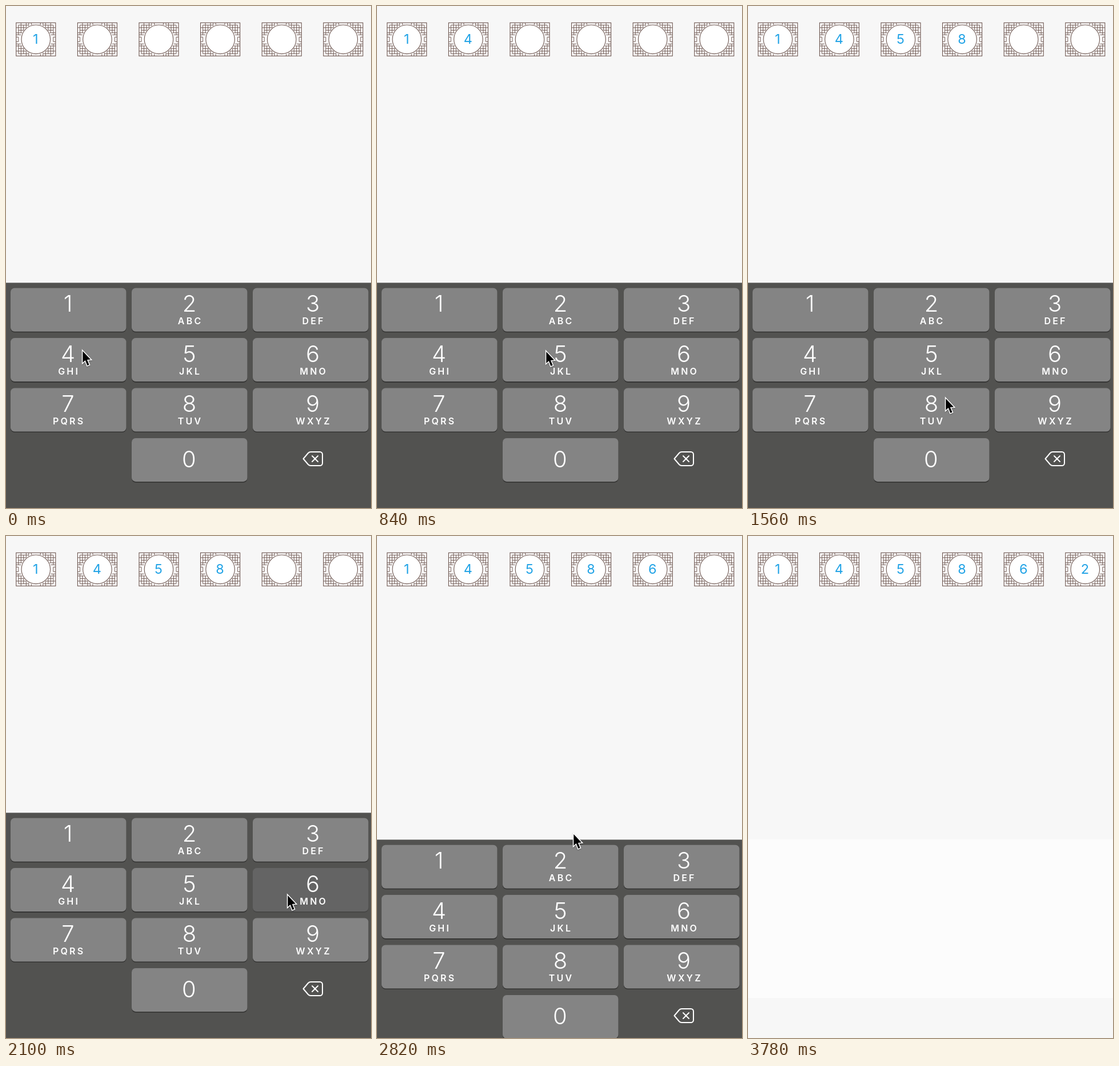
Animation of 639 by 877 pixels, one loop 4200 ms. Source, as an HTML page with a canvas:

```html
<!DOCTYPE html>
<html lang="en">
<head>
<meta charset="utf-8">
<title>Code entry keypad</title>
<style>
html, body { margin: 0; width: 100%; height: 100%; overflow: hidden; background: #f7f7f7; }
canvas { display: block; }
</style>
</head>
<body>
<canvas id="stage" width="639" height="877"></canvas>
<script>
const ctx = document.getElementById('stage').getContext('2d');
const W = 639, H = 877, LOOP = 4200, STEP = 60;
const FONT = 'Inter, Roboto, "Liberation Sans", sans-serif';
const BROWN = '#6c554f';

const KEYS = [
  ['1', ''], ['2', 'ABC'], ['3', 'DEF'],
  ['4', 'GHI'], ['5', 'JKL'], ['6', 'MNO'],
  ['7', 'PQRS'], ['8', 'TUV'], ['9', 'WXYZ'],
  null, ['0', '']
];
const TEXT_X = [108.5, 321, 537];

// digit, press time, release time, time it shows in its slot
const TAPS = [
  ['1', -1, -1, 0],
  ['4', 120, 240, 240],
  ['5', 900, 1020, 1020],
  ['8', 1440, 1560, 1560],
  ['6', 2040, 2160, 2160],
  ['2', 2640, 2760, 2880]
];

// time, x, y
const PATH = [
  [0, 133, 600], [300, 133, 600], [720, 295, 601], [1080, 295, 601],
  [1260, 323, 697], [1500, 323, 697], [1560, 345, 683], [1920, 492, 625],
  [2220, 492, 625], [2520, 343, 518], [3480, 343, 518], [3540, 294, 609]
];
const CURSOR_END = 3720;

const slideAt = t => t < 2820 ? 0 : t < 2880 ? 47 : t < 2940 ? 324 : 400;

function cursorAt(t) {
  for (let i = 1; i < PATH.length; i++) {
    const [t0, x0, y0] = PATH[i - 1], [t1, x1, y1] = PATH[i];
    if (t <= t1) {
      const u = (t - t0) / (t1 - t0), e = u * u * (3 - 2 * u);
      return [x0 + (x1 - x0) * e, y0 + (y1 - y0) * e];
    }
  }
  return PATH[PATH.length - 1].slice(1);
}

function label(text, x, y, size, weight, color, spacing = 0) {
  ctx.font = `${weight} ${size}px ${FONT}`;
  ctx.letterSpacing = spacing + 'px';
  ctx.textAlign = 'center';
  ctx.fillStyle = color;
  ctx.fillText(text, x + spacing / 2, y);
  ctx.letterSpacing = '0px';
}

function roundBox(x, y, w, h, r, color) {
  ctx.fillStyle = color;
  ctx.beginPath();
  ctx.roundRect(x, y, w, h, r);
  ctx.fill();
}

function line(x0, y0, x1, y1) {
  ctx.moveTo(x0, y0);
  ctx.lineTo(x1, y1);
}

// One quarter of the lattice, mirrored by the caller
function latticeQuarter() {
  ctx.beginPath();
  line(30.5, 8, 30.5, 25);
  line(13, 25, 30.5, 25);
  line(26, 11.5, 26, 29);
  line(21.5, 8, 21.5, 25);
  line(17, 16, 17, 29);
  line(12.5, 20.5, 12.5, 29);
  line(8, 25, 8, 29);
  line(0, 25.3, 8, 25.3);
  line(12, 20.5, 34.5, 20.5);
  line(17, 16, 30.5, 16);
  line(21, 11.5, 34.5, 11.5);
  line(26, 8, 34.5, 8);
  line(30.5, 4, 34.5, 4);
  line(30.5, 0, 30.5, 4);
  ctx.stroke();
}

function slot(cx, cy) {
  ctx.save();
  ctx.translate(cx, cy);
  ctx.fillStyle = '#fcfbfb';
  ctx.fillRect(-34.5, -29, 69, 58);
  ctx.strokeStyle = BROWN;
  ctx.lineWidth = 0.95;
  for (const sx of [-1, 1]) for (const sy of [-1, 1]) {
    ctx.save();
    ctx.scale(sx, sy);
    latticeQuarter();
    ctx.restore();
  }
  ctx.lineWidth = 1.1;
  ctx.strokeRect(-34.5, -29, 69, 58);
  ctx.fillStyle = '#fff';
  ctx.beginPath();
  ctx.arc(0, 0, 26.6, 0, 7);
  ctx.fill();
  ctx.beginPath();
  ctx.arc(0, 0, 25.3, 0, 7);
  ctx.stroke();
  ctx.restore();
}

function eraseIcon() {
  ctx.strokeStyle = '#fff';
  ctx.lineWidth = 2;
  ctx.lineJoin = ctx.lineCap = 'round';
  ctx.beginPath();
  ctx.moveTo(520.5, 791);
  ctx.lineTo(529, 781);
  ctx.quadraticCurveTo(530.8, 779, 533.5, 779);
  ctx.arcTo(554, 779, 554, 784, 4.5);
  ctx.arcTo(554, 803, 549, 803, 4.5);
  ctx.lineTo(533.5, 803);
  ctx.quadraticCurveTo(530.8, 803, 529, 801);
  ctx.closePath();
  line(536, 786, 546, 796);
  line(546, 786, 536, 796);
  ctx.stroke();
}

function keypad(t) {
  ctx.save();
  ctx.translate(0, slideAt(t));
  ctx.fillStyle = '#525250';
  ctx.fillRect(0, 483.5, W, H);
  KEYS.forEach((key, i) => {
    if (!key) return;
    const [digit, letters] = key;
    const col = i % 3, row = Math.floor(i / 3);
    const x = 8 + col * 212, y = 492.7 + row * 87.4;
    const down = TAPS.some(([d, from, to]) => d === digit && t >= from && t < to);
    roundBox(x, y + 1.6, 202.5, 76, 7, down ? '#454544' : '#323231');
    roundBox(x, y, 202.5, 76, 7, down ? '#646464' : '#848484');
    label(digit, TEXT_X[col] - (digit === '0' ? 0.7 : 0), y + (digit === '0' ? 51 : 41.5), 40, 300, '#fff');
    if (letters) label(letters, TEXT_X[col], y + 63.7, 16, 600, '#fff', 3.2);
  });
  eraseIcon();
  ctx.restore();
}

function cursor(t) {
  if (t >= CURSOR_END) return;
  const [x, y] = cursorAt(t);
  ctx.save();
  ctx.translate(x + 1.3, y + 3);
  ctx.beginPath();
  ctx.moveTo(0, 0);
  ctx.lineTo(0, 20);
  ctx.lineTo(4.5, 15.9);
  ctx.lineTo(8, 25);
  ctx.lineTo(11.3, 23.7);
  ctx.lineTo(7.6, 14.9);
  ctx.lineTo(13.8, 14.4);
  ctx.closePath();
  ctx.lineJoin = 'miter';
  ctx.lineWidth = 3;
  ctx.strokeStyle = '#fff';
  ctx.shadowColor = 'rgba(0,0,0,.3)';
  ctx.shadowBlur = 2;
  ctx.shadowOffsetY = 1;
  ctx.stroke();
  ctx.shadowColor = 'transparent';
  ctx.fillStyle = '#000';
  ctx.fill();
  ctx.restore();
}

function draw(t) {
  ctx.fillStyle = '#f7f7f7';
  ctx.fillRect(0, 0, W, H);
  if (t >= 2880) {
    ctx.fillStyle = '#fcfcfc';
    ctx.fillRect(0, 530, W, 277);
  }
  TAPS.forEach(([digit, , , shown], i) => {
    const x = 52.3 + i * 107.6;
    slot(x, 58.3);
    if (t >= shown) label(digit, x - 0.5, 66, 23.5, 400, '#21a3e6');
  });
  keypad(t);
  cursor(t);
}

const start = performance.now();
function tick() {
  const t = Math.max(0, performance.now() - start) % LOOP;
  draw(Math.floor(t / STEP) * STEP);
  requestAnimationFrame(tick);
}
tick();
</script>
</body>
</html>
```
